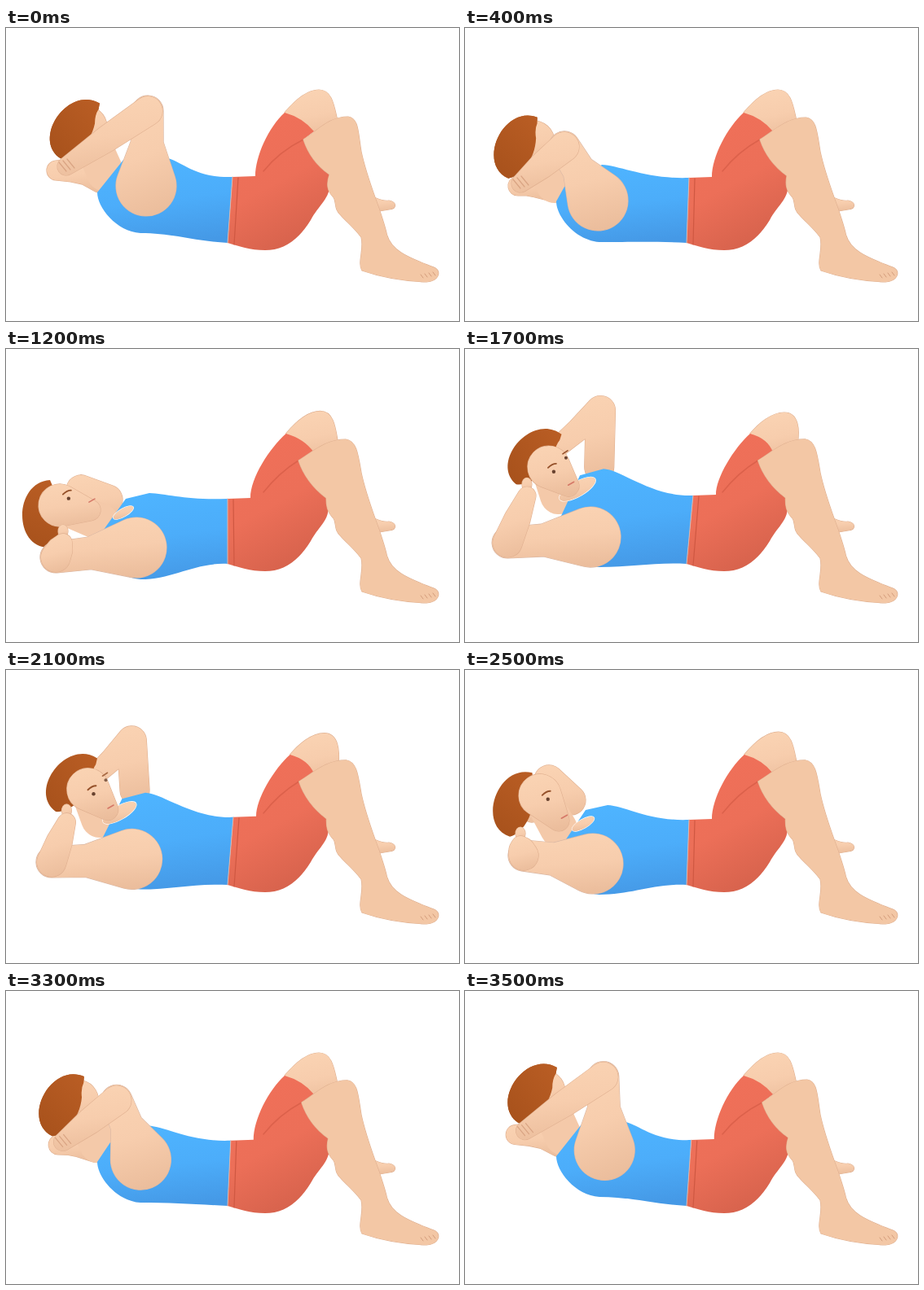
An HTML page for the animation above (3600 ms loop, 556 by 360 pixels).

```html
<!DOCTYPE html>
<html lang="en">
<head>
<meta charset="utf-8">
<title>Twisting crunch</title>
<style>
html, body { margin: 0; width: 100%; height: 100%; overflow: hidden; background: #fff; }
svg { display: block; width: 556px; height: 360px; }
path { stroke-linejoin: round; stroke-linecap: round; }
.skin { fill: url(#skin); stroke: #e0b090; stroke-width: 1.2; paint-order: stroke; }
.line { fill: none; }
</style>
</head>
<body>
<svg id="stage" viewBox="0 0 556 360" xmlns="http://www.w3.org/2000/svg">
<defs>
<linearGradient id="skin" x1=".4" y1="0" x2=".6" y2="1"><stop offset="0" stop-color="#fad3b3"/><stop offset=".5" stop-color="#f7cdad"/><stop offset="1" stop-color="#ebbd9c"/></linearGradient>
<linearGradient id="legSkin" gradientUnits="userSpace" x1="385" y1="190" x2="450" y2="165"><stop offset="0" stop-color="#f3c7a5"/><stop offset=".4" stop-color="#eabc9a"/><stop offset="1" stop-color="#f8d0af"/></linearGradient>
<linearGradient id="shirtFill" x1=".4" y1="0" x2=".6" y2="1"><stop offset="0" stop-color="#4eb4ff"/><stop offset=".5" stop-color="#4cadfa"/><stop offset="1" stop-color="#4599e6"/></linearGradient>
<linearGradient id="shortsFill" x1=".3" y1="0" x2=".7" y2="1"><stop offset="0" stop-color="#f07059"/><stop offset=".5" stop-color="#ec6f58"/><stop offset="1" stop-color="#d4614b"/></linearGradient>
<linearGradient id="hairFill" x1=".6" y1="0" x2=".4" y2="1"><stop offset="0" stop-color="#b95d24"/><stop offset="1" stop-color="#a8521c"/></linearGradient>
</defs>
</svg>
<script>
const CYCLE = 3600, STEP = 100, HIP = [272, 264];

// Joints per pose; look: 1 profile, 0 towards the viewer; legs: near and far knee sway.
const backUp = {
  face: [98, 122], chin: [112, 135], hair: [84, 126], tilt: [34], neck: [122, 178],
  collar: [192, 159], strap: [144, 162], waist: [278, 183], back: [252],
  shoulder: [172, 194], elbow: [174, 102], hand: [74, 170],
  farShoulder: [118, 185], farElbow: [100, 175], farHand: [62, 175],
  neckline: [0], look: [1], front: [0], legs: [0, 0]
};
const backMid = {
  face: [84, 140], chin: [92, 155], hair: [64, 148], tilt: [24], neck: [110, 192],
  collar: [168, 168], strap: [122, 195], waist: [275, 184], back: [263],
  shoulder: [163, 212], elbow: [122, 146], hand: [68, 191],
  farShoulder: [108, 195], farElbow: [88, 190], farHand: [65, 194],
  neckline: [0], look: [1], front: [0], legs: [.5, 0]
};
const down = {
  face: [66, 192], chin: [103, 198], hair: [47, 206], tilt: [0], neck: [115, 212],
  collar: [176, 177], strap: [147, 184], waist: [272, 184], back: [283],
  shoulder: [160, 244], elbow: [61, 256], hand: [70, 238],
  farShoulder: [125, 185], farElbow: [92, 173], farHand: [75, 205],
  neckline: [1], look: [1], front: [1], legs: [1, .2]
};
const frontMid = {
  face: [92, 154], chin: [115, 185], hair: [62, 167], tilt: [18], neck: [115, 195],
  collar: [175, 166], strap: [148, 172], waist: [275, 184], back: [276],
  shoulder: [157, 238], elbow: [72, 228], hand: [68, 215],
  farShoulder: [130, 160], farElbow: [103, 135], farHand: [82, 175],
  neckline: [1.1], look: [.5], front: [1], legs: [.9, .1]
};
const frontUp = {
  face: [103, 145], chin: [127, 168], hair: [84, 134], tilt: [41], neck: [115, 180],
  collar: [170, 147], strap: [141, 155], waist: [280, 180], back: [268],
  shoulder: [154, 231], elbow: [52, 238], hand: [76, 180],
  farShoulder: [165, 145], farElbow: [167, 75], farHand: [112, 122],
  neckline: [1.8], look: [0], front: [1], legs: [.9, 1]
};

const lerp = (a, b, k) => a.map((n, i) => n + (b[i] - n) * k);
const mix = (a, b, k) => Object.fromEntries(Object.keys(a).map(key => [key, lerp(a[key], b[key], k)]));
const frontTop = mix(frontMid, frontUp, 1.08);
const easeIn = k => k ** 1.6, easeOut = k => 1 - (1 - k) ** 2, hold = k => k;
const keys = [
  [0, backUp, easeIn], [400, backMid, easeOut], [1050, down, hold], [1200, down, easeIn],
  [1450, frontMid, easeOut], [1800, frontTop, easeIn], [2500, frontMid, easeOut],
  [3000, down, easeIn], [3250, backMid, easeOut], [CYCLE, backUp, hold]
];

function poseAt(t) {
  const i = keys.findLastIndex(key => key[0] <= t);
  const [start, from, ease] = keys[i], [end, to] = keys[i + 1];
  return mix(from, to, ease((t - start) / (end - start)));
}

const add = ([x, y], dx, dy) => [x + dx, y + dy];
const polar = ([x, y], r, a) => [x + r * Math.cos(a), y + r * Math.sin(a)];
const oval = ([x, y], rx, ry = rx, turn = 0) => {
  const a = turn * Math.PI / 180, dx = rx * Math.cos(a), dy = rx * Math.sin(a);
  return `M${x - dx},${y - dy}a${rx},${ry} ${turn} 1 1 ${2 * dx},${2 * dy}a${rx},${ry} ${turn} 1 1 ${-2 * dx},${-2 * dy}Z`;
};

// Two circles joined by their outer tangents.
function capsule([p, r], [q, s]) {
  const dx = q[0] - p[0], dy = q[1] - p[1], d = Math.hypot(dx, dy);
  if (d <= Math.abs(r - s)) return r > s ? oval(p, r) : oval(q, s);
  const a = Math.atan2(dy, dx), b = Math.acos((r - s) / d), wide = b > Math.PI / 2;
  return `M${polar(p, r, a + b)}A${r},${r} 0 ${+!wide} 1 ${polar(p, r, a - b)}` +
    `L${polar(q, s, a - b)}A${s},${s} 0 ${+wide} 1 ${polar(q, s, a + b)}Z`;
}
const limb = (...joints) => joints.slice(1).map((joint, i) => capsule(joints[i], joint)).join('');

const stage = document.getElementById('stage'), parts = {};
function part(name, attrs) {
  const el = document.createElementNS('http://www.w3.org/2000/svg', 'path');
  for (const key in attrs) el.setAttribute(key, attrs[key]);
  parts[name] = el;
  stage.append(el);
}
const set = (name, d, opacity = 1) => {
  parts[name].setAttribute('d', d);
  parts[name].setAttribute('opacity', opacity);
};
const skin = { class: 'skin' }, hair = { fill: 'url(#hairFill)' }, dark = { fill: '#68422f' };
const stroke = (color, width) => ({ class: 'line', stroke: color, 'stroke-width': width });

part('farFoot', skin);
part('farThigh', skin);
part('shorts', { fill: 'url(#shortsFill)' });
part('crease', stroke('#dc614b', 1.5));
part('nearLeg', { ...skin, style: 'fill:url(#legSkin)' });
part('toes', stroke('#d39c7b', 1));
part('farArm', skin);
part('neck', { fill: '#f4c9a9' });
part('shirt', { fill: 'url(#shirtFill)' });
part('waist', stroke('#d9b8b0', 1));
part('band', stroke('#cf5842', 1.2));
part('neckline', { ...skin, style: 'stroke:#fff' });
part('hairBehind', hair);
part('face', skin);
part('hairOver', hair);
part('ear', skin);
part('brow', stroke('#95512a', 1.8));
part('farBrow', stroke('#95512a', 1.6));
part('eye', dark);
part('farEye', dark);
part('mouth', stroke('#d57867', 1.6));
part('upperArm', { ...skin, style: 'stroke:#d9b7a4' });
part('forearm', skin);
part('fingers', stroke('#d9a483', 1.2));

function drawLegs({ waist: [wx, wy], legs: [near, far] }) {
  const hemX = 365 - 6 * near, hemEnd = [397 - 4 * near, 180 + 3 * near];
  const kneeX = 420 - 3 * near, kneeY = 109 + 2 * near;
  const farX = 342 + 8 * far, farTop = 76 + 2 * far, crotch = wx + 28;
  set('farFoot', 'M440,205C452,206 460,214 470,212C480,214 480,222 470,223L452,226Z');
  set('farThigh', `M${farX},104C${farX + 10},92 ${farX + 26},${farTop} ${farX + 42},${farTop}
    C${farX + 60},${farTop} ${farX + 61},100 408,118L390,140L378,127Z`);
  set('shorts', `M${wx},${wy}L${crotch},${wy - 1}C${crotch},158 ${farX - 20},122 ${farX},104
    Q${farX + 22},110 378,127L${hemX},137Q${hemX + 9},164 ${hemEnd}
    C402,208 385,215 374,236C358,262 340,273 318,273C300,273 285,268 ${HIP}Z`);
  set('crease', `M${hemX},137Q335,152 316,176`);
  set('nearLeg', `M${hemX},137C${hemX + 18},126 ${kneeX - 24},${kneeY} ${kneeX},${kneeY}
    C${kneeX + 13},${kneeY + 2} 432,128 436,152C444,190 460,222 467,252C472,276 500,284 527,295
    C534,300 531,311 516,312C490,311 460,306 437,298C431,288 440,272 436,257
    C428,246 418,238 411,230C402,222 406,214 402,208C394,200 393,192 ${hemEnd}
    Q${hemX + 9},164 ${hemX},137Z`);
  set('toes', [0, 1, 2, 3].map(i => `M${509 + 5 * i},${303 - i}l3,4`).join(''));
  set('waist', `M${wx},${wy}L${HIP}`);
  set('band', `M${wx + 7},${wy + 1}L${add(HIP, 8, 2)}`);
}

function drawTorso(p) {
  const low = [165, p.back[0]], nape = [112, p.back[0] - 50];
  set('shirt', `M${p.collar}C${add(p.collar, 22, 1)} ${add(p.waist, -50, 2)} ${p.waist}L${HIP}
    C${add(HIP, -40, -2)} ${add(low, 40, 0)} ${low}C${add(low, -30, -2)} ${add(nape, 0, 18)} ${nape}
    L${p.strap}Z`);
  set('neck', limb([p.face, 22], [p.neck, 23]));
  const open = p.neckline[0];
  set('neckline', oval(add(p.strap, -3, 17), 14 * open, 5 * open, -30), open > .1 ? 1 : 0);
}

function drawArms(p) {
  const middle = (a, b, k) => lerp(p[a], p[b], k);
  set('upperArm', limb([p.elbow, 19], [middle('elbow', 'shoulder', .45), 20], [p.shoulder, 37]));
  set('forearm', limb([p.elbow, 18], [middle('elbow', 'hand', .5), 16], [p.hand, 11]));
  set('farArm', limb([p.farShoulder, 18], [p.farElbow, 18], [middle('farElbow', 'farHand', .5), 14], [p.farHand, 12]));
  const knuckle = add(p.hand, -9, -5);
  set('fingers', [0, 1, 2].map(i => `M${add(knuckle, 5 * i, -2 * i)}l9,11`).join(''), 1 - p.front[0]);
}

function drawHead(p) {
  const front = p.front[0], look = p.look[0], facing = Math.max(0, 1 - 2 * look) * front;
  const side = Math.atan2(p.chin[1] - p.face[1], p.chin[0] - p.face[0]) - Math.PI / 2;
  const eye = polar(lerp(p.face, p.chin, .25), 10 * look, side);
  const mouth = polar(p.chin, 4 + 8 * look, side);
  const brow = at => `M${add(at, -7, -5)}Q${add(at, -2, -10)} ${add(at, 3, -10)}`;
  const farEye = add(eye, 15, -17);
  for (const name of ['hairBehind', 'hairOver']) {
    set(name, 'M7,-45C-38,-42 -38,38 5,38C18,30 26,4 16,-21Q10,-30 10,-38Z', name === 'hairOver' ? 1 - front : 1);
    parts[name].setAttribute('transform', `translate(${p.hair}) rotate(${p.tilt})`);
  }
  set('face', limb([p.face, 26], [p.chin, 13]));
  set('ear', oval(add(p.hand, 0, -14), 6, 8), front);
  set('brow', brow(eye), front);
  set('eye', oval(eye, 2.2), front);
  set('farBrow', `M${add(farEye, -4, -5)}l6,-4`, facing);
  set('farEye', oval(farEye, 2), facing);
  set('mouth', `M${add(mouth, -3, 2)}l7,-4`, front);
}

const began = performance.now();
function tick() {
  const t = (performance.now() - began) % CYCLE;
  const pose = poseAt(Math.floor(t / STEP) * STEP);
  for (const draw of [drawLegs, drawTorso, drawArms, drawHead]) draw(pose);
  requestAnimationFrame(tick);
}
tick();
</script>
</body>
</html>
```
